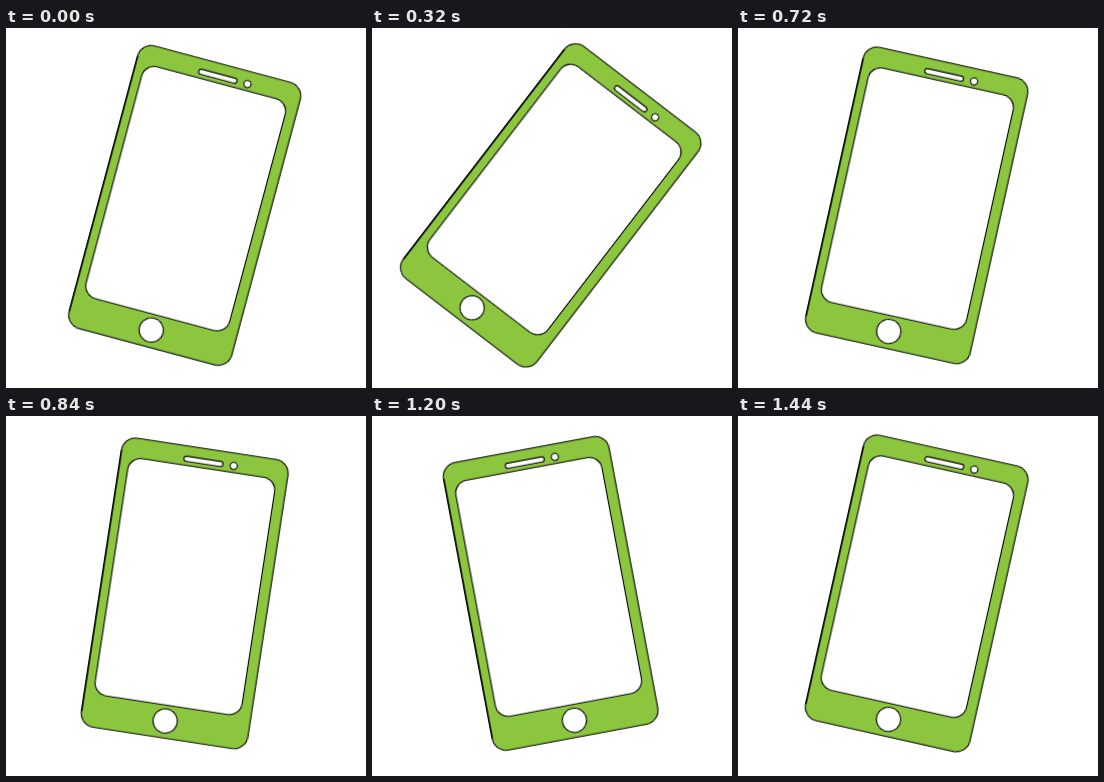
Write an HTML page that moves like this. It is 360 by 360 pixels and loops after 1520 ms.

```html
<!DOCTYPE html>
<html lang="en">
<head>
<meta charset="utf-8">
<title>Shaking phone</title>
<style>
  html, body { margin: 0; width: 100%; height: 100%; overflow: hidden; background: #fff; }
  svg { display: block; width: 100vw; height: 100vh; }

  .phone {
    fill: #fff;
    stroke: #000;
    stroke-width: 1.1;
    animation: shake 1520ms step-end infinite;
  }
  .body { fill: #8cc63f; }
  .edge { stroke-width: 1.5; }

  /* Constant-speed swing in held poses, with rests at the top and mid-fall */
  @keyframes shake {
    0%      { transform: rotate(15deg); }
    5.26%   { transform: rotate(20.4deg); }
    10.52%  { transform: rotate(28deg); }
    15.78%  { transform: rotate(35.4deg); }
    21.05%  { transform: rotate(37.5deg); }
    31.57%  { transform: rotate(35.3deg); }
    36.84%  { transform: rotate(27.6deg); }
    42.1%   { transform: rotate(20deg); }
    47.36%  { transform: rotate(12.5deg); }
    55.26%  { transform: rotate(8.7deg); }
    57.89%  { transform: rotate(4.9deg); }
    63.15%  { transform: rotate(-2.7deg); }
    68.42%  { transform: rotate(-10.4deg); }
    73.68%  { transform: rotate(-18deg); }
    78.94%  { transform: rotate(-10.6deg); }
    84.21%  { transform: rotate(-3deg); }
    89.47%  { transform: rotate(4.9deg); }
    94.73%  { transform: rotate(12.6deg); }
    100%    { transform: rotate(15deg); }
  }
</style>
</head>
<body>
<svg viewBox="0 0 360 360">
  <g transform="translate(178.7 177.4)">
    <g class="phone">
      <rect class="body" x="-84.2" y="-146.2" width="168.4" height="292.4" rx="14"/>
      <path class="edge" d="M-84.2 -132V132"/>
      <rect x="-75.1" y="-126.8" width="148.6" height="240" rx="13"/>
      <rect x="-21.2" y="-135.9" width="39.6" height="5.2" rx="2.6"/>
      <circle cx="29.2" cy="-133.4" r="3.6"/>
      <circle cy="129.1" r="12.1"/>
    </g>
  </g>
</svg>
</body>
</html>
```
